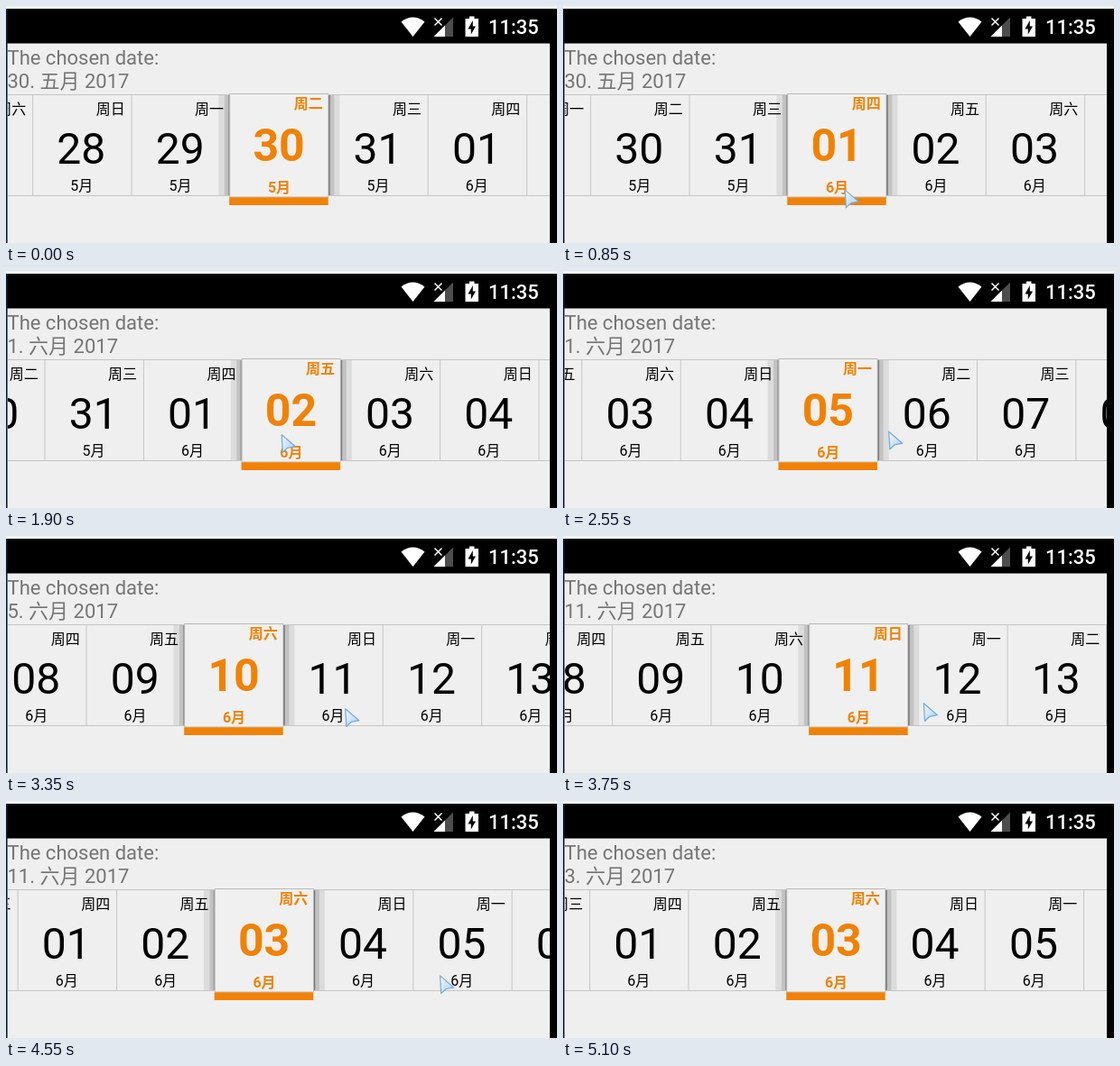
Write an HTML page that moves like this. It is 610 px wide and 263 px high and loops after 5.55 s.

```html
<!DOCTYPE html>
<html lang="en">
<head>
<meta charset="utf-8">
<title>Horizontal date picker</title>
<style>
  html, body { margin: 0; width: 100%; height: 100%; overflow: hidden; background: #efefef; }
  svg { display: block; width: 610px; height: 263px; }
  text { font-family: Roboto, "Noto Sans CJK SC", "Noto Sans CJK", sans-serif; white-space: pre; }
  .title { font-size: 22px; fill: #757575; }
  .clock { font-size: 22px; font-weight: 500; fill: #fff; }
  .num { font-size: 48px; text-anchor: middle; }
  .week { font-size: 16px; text-anchor: end; }
  .month { font-size: 16px; text-anchor: middle; }
  .on text { fill: #f18200; font-weight: 700; }
  .on .num { font-size: 50px; }
</style>
</head>
<body>
<svg viewBox="0 0 610 263">
  <defs>
    <clipPath id="screen"><rect x="2" y="41" width="600" height="222"/></clipPath>
    <linearGradient id="ice" x1="0" y1="0" x2="1" y2="1">
      <stop offset="0" stop-color="#f4faff"/>
      <stop offset="1" stop-color="#a5cdf1"/>
    </linearGradient>
  </defs>
  <rect width="610" height="263" fill="#efefef"/>
  <rect width="610" height="3" fill="#f3f6f5"/>
  <rect y="3" width="610" height="38.5"/>
  <rect x="602" y="3" width="8" height="260"/>
  <rect y="3" width="1.6" height="260" fill="#0b1e3c"/>

  <!-- status icons -->
  <path d="M437.5 17.5Q450.5 7.500 463.500 17.500L450.500 34Z" fill="#fff"/>
  <path d="M495 12.500V34H473.500Z" fill="#4d4d4d"/>
  <path d="M486 21.500V34H473.500Z" fill="#fff"/>
  <path d="M474.500 13.500L482.500 21.500M482.500 13.500L474.500 21.500" stroke="#000" stroke-width="4"/>
  <path d="M474.500 13.500L482.500 21.500M482.500 13.500L474.500 21.500" stroke="#fff" stroke-width="1.500"/>
  <path d="M508.500 14H513V11.500H518.500V14H523V34H508.500Z" fill="#fff"/>
  <path d="M516.800 16L511.500 25.500H514.800V31.500L520 22.500H516.800Z"/>
  <text class="clock" x="534" y="31">11:35</text>

  <text class="title" x="1.5" y="65">The chosen date:</text>
  <text class="title" id="title" x="1.5" y="91"></text>

  <g clip-path="url(#screen)">
    <path d="M2 98.500H602M2 210.500H602" stroke="#c6c6c6"/>
    <g id="cells"></g>
  </g>
  <path id="cursor" d="M.7 .7L1.800 20.500L7.200 15.300L15.800 13.700Z"
        fill="url(#ice)" stroke="#79a9d9" stroke-width="1.2" stroke-linejoin="round"/>
</svg>
<script>
const LOOP = 5550, STEP = 50, PITCH = 109.4, LEFT = 247.9, MAY = 31;
const $ = id => document.getElementById(id);

// time, day at the centre (counted from 1 May)
const scroll = [
  [400, 30], [500, 30.3], [650, 31.2], [900, 32.1], [1150, 32.36], [1350, 32.306],
  [1500, 32], [1700, 32], [1900, 32.8775], [2050, 34.2], [2300, 35.7], [2550, 36.08],
  [2650, 36], [2900, 36], [3050, 37.8], [3200, 39.9], [3350, 41.457], [3600, 42],
  [3700, 42], [3850, 40.6], [4000, 38], [4150, 35.984], [4400, 34.5], [4600, 34.1], [4900, 34]
];
// time, x, y
const pointer = [
  [400, 399, 182], [650, 215, 190], [900, 330, 205], [1350, 388.5, 208], [1650, 410, 195],
  [1900, 304.5, 181], [2050, 215, 178], [2250, 260, 185], [2550, 360, 177.5], [2850, 420, 180],
  [3050, 225, 185], [3350, 375, 191], [3650, 330, 185], [3950, 595, 185], [4150, 232, 164.5],
  [4450, 450, 190], [4800, 520, 200], [5100, 520, 243]
];
const titles = [[0, 30], [1200, 32], [2650, 36], [3600, 42], [4900, 34]];

const dayOf = d => d > MAY ? d - MAY : d;
const weekOf = d => "周" + "日一二三四五六"[d % 7];
const monthOf = d => (d > MAY ? 6 : 5) + "月";
const titleOf = d => `${dayOf(d)}. ${d > MAY ? "六" : "五"}月 2017`;

// monotone cubic through the points of a table
function sample(table, t, c = 1) {
  const last = table.length - 1;
  if (t <= table[0][0]) return table[0][c];
  if (t >= table[last][0]) return table[last][c];
  const i = table.findIndex(k => k[0] > t) - 1;
  const slope = j => j < 0 || j >= last ? 0 :
    (table[j + 1][c] - table[j][c]) / (table[j + 1][0] - table[j][0]);
  const tangent = j => {
    const a = slope(j - 1), b = slope(j);
    return a * b <= 0 ? 0 : 2 * a * b / (a + b);
  };
  const h = table[i + 1][0] - table[i][0], u = (t - table[i][0]) / h, v = 1 - u;
  return v * v * (1 + 2 * u) * table[i][c] + u * u * (3 - 2 * u) * table[i + 1][c]
    + h * u * v * (v * tangent(i) - u * tangent(i + 1));
}

function add(parent, tag, attrs) {
  const el = document.createElementNS("http://www.w3.org/2000/svg", tag);
  for (const k in attrs) el.setAttribute(k, attrs[k]);
  return parent.appendChild(el);
}
const box = (g, x, y, width, height, fill) => add(g, "rect", { x, y, width, height, fill });
const label = (g, name, x, y) => add(g, "text", { class: name, x, y });

function makeCell(on) {
  const g = add($("cells"), "g", { class: on ? "on" : "" });
  if (on) {
    box(g, -12.5, 99, 6.5, 111, "rgba(0,0,0,.08)");
    box(g, -6, 99, 4, 111, "rgba(0,0,0,.19)");
    box(g, -2, 99, 2, 111, "rgba(0,0,0,.36)");
    box(g, 109, 99, 2, 111, "rgba(0,0,0,.42)");
    box(g, 111, 99, 4.5, 111, "rgba(0,0,0,.19)");
    box(g, 115.5, 99, 6, 111, "rgba(0,0,0,.08)");
    box(g, -.7, 97, 110, 115.5, "#b9b9b9");
    box(g, .3, 98, 108.3, 113.5, "#f0f0f0");
    box(g, -.7, 212.3, 109.5, 8.7, "#f18200");
  } else {
    box(g, 0, 99, 1, 111, "#c6c6c6");
  }
  const num = label(g, "num", 54.2, on ? 171.5 : 175);
  const week = label(g, "week", on ? 102.8 : 102.6, on ? 113.5 : 119.5);
  const month = label(g, "month", 54.6, on ? 207 : 205);
  return (day, p) => {
    g.setAttribute("transform", `translate(${LEFT + (day - p) * PITCH} 0)`);
    num.textContent = String(dayOf(day)).padStart(2, "0");
    week.textContent = weekOf(day);
    month.textContent = monthOf(day);
  };
}

const sides = [-3, -2, -1, 1, 2, 3, 4].map(n => [n, makeCell(false)]);
const chosen = makeCell(true);

function draw(t) {
  const p = sample(scroll, t), day = Math.round(p);
  sides.forEach(([n, place]) => place(day + n, p));
  chosen(day, p);
  $("title").textContent = titleOf(titles.filter(k => k[0] <= t).pop()[1]);
  const shown = t >= 50 && t < 5100;
  $("cursor").setAttribute("visibility", shown ? "visible" : "hidden");
  $("cursor").setAttribute("transform",
    `translate(${sample(pointer, t)} ${sample(pointer, t, 2)})`);
}

const start = performance.now();
function tick() {
  const t = (performance.now() - start) % LOOP;
  draw(Math.floor(t / STEP) * STEP);
  requestAnimationFrame(tick);
}
tick();
</script>
</body>
</html>
```
